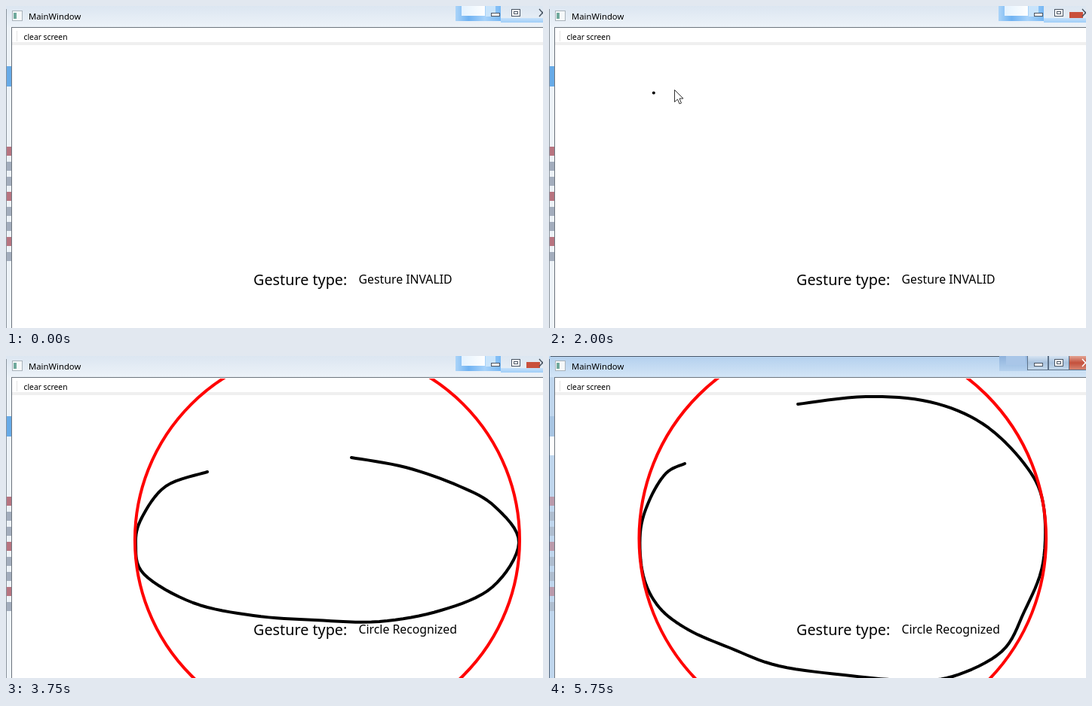
Write an HTML page with a canvas that moves like this. It is 712 px wide and 428 px high and loops after 7000 ms.

```html
<!DOCTYPE html>
<html lang="en">
<head>
<meta charset="utf-8">
<title>MainWindow</title>
<style>
  html, body { margin: 0; width: 100%; height: 100%; overflow: hidden; background: #fff; }
  canvas { display: block; }
</style>
</head>
<body>
<canvas id="stage" width="712" height="428"></canvas>
<script>
const ctx = document.getElementById('stage').getContext('2d');
const LOOP = 7000, RED_CLOSE = 500, ACTIVE = 5000;

// A stroke is a few key points, joined by a smooth curve
const oval = (cx, cy, rx, ry, from, to) => Array.from({ length: 13 }, (_, i) => {
  const a = from + (to - from) * i / 12;
  return [cx + rx * Math.cos(a), cy + ry * Math.sin(a)];
});
const first = oval(335, 262, 220, 196, 3.66, -1.57);
const second = [[318,109],[255,106],[195,121],[150,155],[131,185],[118,245],[160,325],[290,380],[440,390],[600,345],[668,245],[600,150],[460,92]];
const third = oval(298, 178, 172, 165, 3.53, -1.57);
const fourth = [[143,137],[106,202],[100,250],[129,319],[185,358],[250,376],[320,363],[420,331],[505,296],[516,250],[490,193],[407,138],[350,118],[302,121]];
const fifth = [[267,154],[212,173],[180,215],[172,250],[183,290],[248,328],[328,345],[410,351],[495,353],[577,338],[645,307],[680,248],[648,200],[601,173],[530,148],[458,135]];
const sixth = [[180,143],[155,156],[133,192],[121,235],[125,292],[146,334],[185,364],[240,388],[305,412],[400,425],[475,431],[535,426],[600,393],[630,340],[655,275],[655,195],[630,143],[575,90],[505,61],[420,54],[330,64]];

// n: how far the stroke has come, poly: corners of the fitted polyline (both in key points)
const scenes = [
  { at: 0 },
  { at: 250, cursor: [139,152] },
  { at: 500, stroke: first, n: .15, poly: [0,.15] },
  { at: 750, stroke: first },
  { at: 1000, cursor: [36,44] },
  { at: 1250, stroke: second, n: 4, poly: [0,3,4], cursor: [441,135] },
  { at: 1500, stroke: second, cursor: [436,408] },
  { at: 1750, stroke: second, cursor: [326,382] },
  { at: 2000, stroke: third, n: 0, cursor: [166,111] },
  { at: 2250, stroke: third },
  { at: 2500, cursor: [64,40] },
  { at: 2750, stroke: fourth, n: 7.6 },
  { at: 3000, stroke: fourth, cursor: [42,33] },
  { at: 3500, stroke: fifth, n: 4.7 },
  { at: 3750, stroke: fifth },
  { at: 4750, stroke: fifth, cursor: [40,44] },
  { at: 5000, stroke: sixth, n: 3, poly: [0,.6,2.65,3], cursor: [119,272] },
  { at: 5250, stroke: sixth, n: 17 },
  { at: 5500, stroke: sixth, cursor: [211,67] },
  { at: 5750, stroke: sixth }
];

function box(color, x, y, w, h) {
  ctx.fillStyle = color;
  ctx.fillRect(x, y, w, h);
}

function frame(color, x, y, w, h) {
  ctx.strokeStyle = color;
  ctx.lineWidth = 1;
  ctx.strokeRect(x + .5, y + .5, w - 1, h - 1);
}

function fade(x0, y0, x1, y1, ...colors) {
  const g = ctx.createLinearGradient(x0, y0, x1, y1);
  colors.forEach((c, i) => g.addColorStop(i / (colors.length - 1), c));
  return g;
}

function text(str, x, y, size) {
  ctx.font = `${size}px "Noto Sans", "Open Sans", sans-serif`;
  ctx.fillStyle = '#000';
  ctx.fillText(str, x, y);
}

function line(points, color) {
  ctx.beginPath();
  ctx.moveTo(...points[0]);
  points.forEach(p => ctx.lineTo(...p));
  ctx.strokeStyle = color;
  ctx.stroke();
}

// Catmull-Rom position at key point parameter t
function along(keys, t) {
  const i = Math.min(Math.floor(t), keys.length - 2), u = t - i;
  const at = k => keys[Math.max(0, Math.min(keys.length - 1, k))];
  const [a, b, c, d] = [at(i - 1), at(i), at(i + 1), at(i + 2)];
  return [0, 1].map(k => b[k] + u / 2 * (c[k] - a[k]
    + u * (2 * a[k] - 5 * b[k] + 4 * c[k] - d[k] + u * (3 * (b[k] - c[k]) + d[k] - a[k]))));
}

// Draws the stroke with its fitted shape and returns the verdict
function drawGesture({ stroke, n = stroke.length - 1, poly }) {
  const pts = [];
  for (let t = 0; t < n; t += 1 / 8) pts.push(along(stroke, t));
  pts.push(along(stroke, n));
  ctx.lineWidth = 4;
  line(pts, '#000');
  if (!n) return 'Gesture INVALID';
  if (poly) {
    line(poly.map(t => along(stroke, t)), '#f00');
    return 'Polyline Recognized';
  }
  // Circle around the middle of the stroke's bounds
  const [[x0, x1], [y0, y1]] = [0, 1].map(k => {
    const v = pts.map(p => p[k]);
    return [Math.min(...v), Math.max(...v)];
  });
  ctx.beginPath();
  ctx.arc((x0 + x1) / 2, (y0 + y1) / 2, Math.max(x1 - x0, y1 - y0) / 2 + 1, 0, 7);
  ctx.strokeStyle = '#f00';
  ctx.stroke();
  return 'Circle Recognized';
}

function drawCursor([x, y]) {
  ctx.save();
  ctx.translate(x + .5, y + .5);
  const arrow = new Path2D('M0 0V16L4 12.5L6.5 18.5L9 17.5L6.5 11.5H11.5Z');
  ctx.fillStyle = '#fff';
  ctx.fill(arrow);
  ctx.strokeStyle = '#333';
  ctx.lineWidth = 1;
  ctx.stroke(arrow);
  ctx.restore();
}

function drawButtons(active, red) {
  if (active) {
    box(fade(0, 0, 0, 22, '#8fb2dc', '#a3c3e6', '#b9d4ef'), 597, 0, 38, 20);
    box('#a9c6e8', 606, 0, 26, 12);
    box(fade(0, 0, 0, 18, '#d5e3f2', '#a9c3de', '#c5d9ec'), 634, 0, 55, 18);
    box(fade(0, 0, 0, 18, '#e3a595', '#c4503c', '#d68370'), 689, 0, 23, 18);
    [634, 662, 689].forEach(x => frame('#5d7289', x, -1, 28, 20));
  } else {
    box(fade(592, 0, 656, 0, '#b9dcfa', '#6fb2f2', '#a8d3fa', '#78b8f4'), 596, 0, 60, 20);
    box(fade(604, 0, 636, 0, '#e4f2fe', '#fff'), 604, 0, 31, 13);
    box('#c9e4fb', 636, 0, 13, 14);
    box(fade(0, 14, 0, 22, '#d3e8fb', '#9fcdf8'), 656, 16, 56, 6);
    if (red) box('#c9503c', 690, 8, 18, 8);
  }
  const ink = '#4a5563';
  box('#fff', 643, 9, 12, 5);
  frame(ink, 643, 9, 12, 5);
  box('#fff', 670, 4, 12, 10);
  frame(ink, 670, 4, 12, 10);
  frame(ink, 673, 7, 6, 4);
  ctx.strokeStyle = active ? '#fff' : ink;
  ctx.lineWidth = 1.5;
  ctx.stroke(new Path2D('M707 4L716 14M707 14L716 4'));
}

function drawWindow(active, red) {
  box('#fff', 0, 0, 712, 428);
  box(active ? fade(0, 0, 0, 28, '#b3d0ee', '#d3e5f6') : fade(0, 0, 0, 28, '#dce6f1', '#ecf2f8'), 0, 0, 712, 28);

  // Desktop showing through the left border
  box(active ? '#c0d7ee' : '#eef3f8', 0, 28, 7, 400);
  if (active) box('#fff', 1, 107, 6, 25);
  box(active ? '#a9c6e4' : '#67abe8', 0, 80, 7, 27);
  ctx.globalAlpha = active ? .6 : 1;
  for (let i = 0; i < 8; i++) box(i % 3 ? '#a3adbd' : '#b87480', 0, 187 + i * 20, 7, 12);
  ctx.globalAlpha = 1;
  box(active ? '#52667d' : '#8b949e', 0, 4, 1, 424);
  box('#6c747d', 7, 28, 1, 400);
  box('#6c747d', 7, 28, 705, 1);
  if (active) box('#4d5b6b', 2, 0, 632, 1);

  box('#f6f8f9', 8, 6, 14, 14);
  frame('#a9b3bb', 8, 6, 14, 14);
  box('#6fa99c', 10, 9, 4, 8);
  text('MainWindow', 30, 18, 11.3);
  drawButtons(active, red);

  box('#efefef', 8, 48, 704, 4);
  box('#e4e4e4', 14, 33, 1, 14);
  text('clear screen', 23.5, 45, 10.3);
}

function draw(now) {
  const t = now % LOOP;
  const scene = scenes.filter(s => s.at <= t).pop();
  let label = 'Gesture INVALID';
  drawWindow(t >= ACTIVE, t >= RED_CLOSE);
  if (scene.stroke) {
    ctx.save();
    ctx.beginPath();
    ctx.rect(8, 30, 704, 398);
    ctx.clip();
    ctx.lineCap = ctx.lineJoin = 'round';
    label = drawGesture(scene);
    ctx.restore();
  }
  text('Gesture type:', 328, 371, 19.8);
  text(label, 467.5, 369, 15.8);
  if (scene.cursor) drawCursor(scene.cursor);
}

const start = performance.now();
function tick() {
  draw(performance.now() - start);
  requestAnimationFrame(tick);
}
tick();
</script>
</body>
</html>
```
